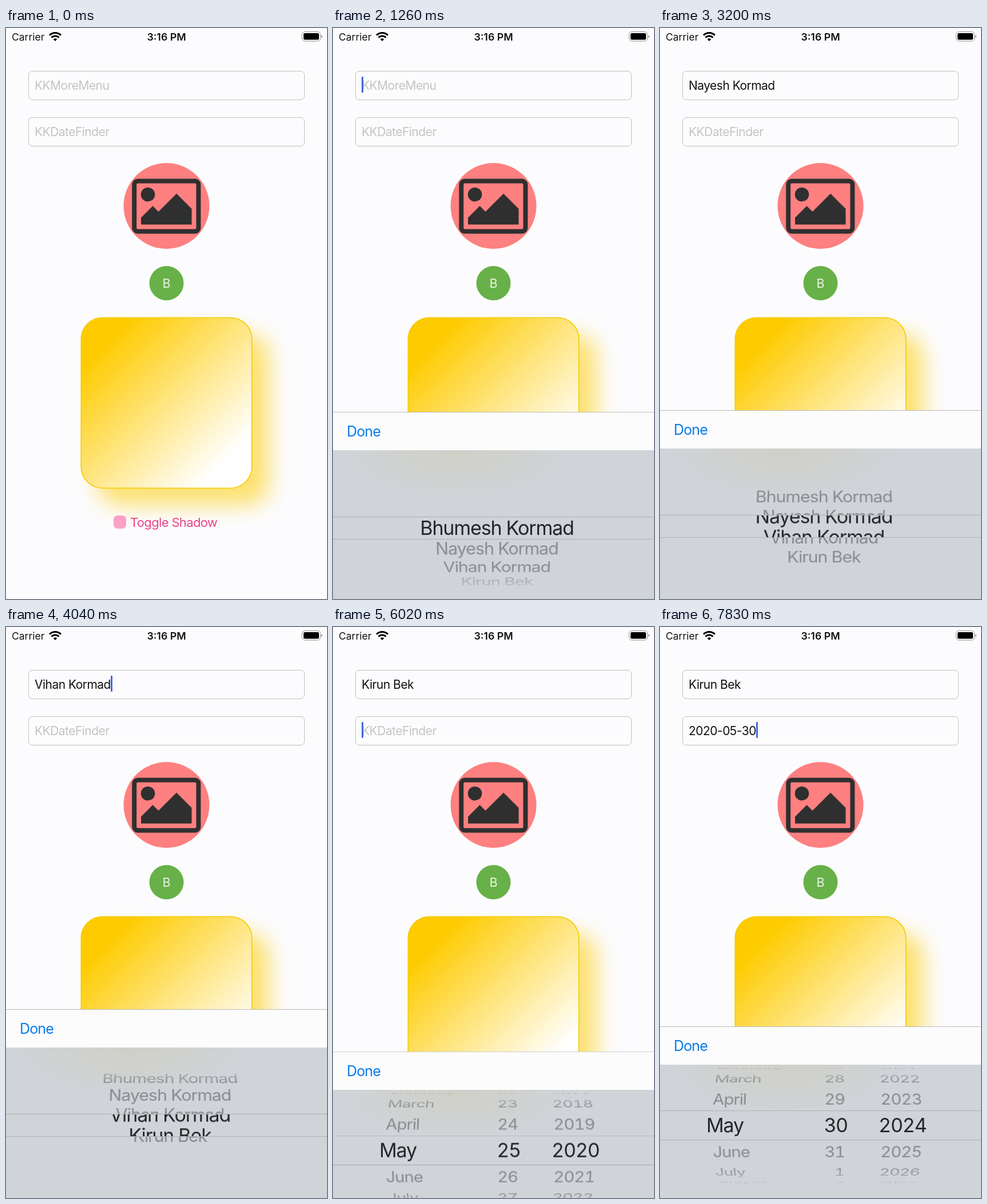
An HTML page without scripts that plays this animation: 561 by 998 pixels, repeating every 7.99 s.

```html
<!DOCTYPE html>
<html lang="en">
<head>
<meta charset="utf-8">
<title>Form controls</title>
<style>
@property --n { syntax: "<number>"; inherits: true; initial-value: 0; }
* { box-sizing: border-box; margin: 0; }
html, body { width: 100%; height: 100%; overflow: hidden; background: #fcfcfe; }
body { font-family: Inter, Roboto, sans-serif; }
.stage { position: relative; width: 561px; height: 998px; overflow: hidden; background: #fcfcfe; }
.stage > *, .stage p { position: absolute; }
p { white-space: nowrap; }

.field { left: 39px; width: 483px; height: 51px; border: 1px solid #bfbfba; border-radius: 7px; }
.field p { left: 10px; top: 0; font-size: 21px; line-height: 49px; letter-spacing: -.025em; color: #111;
  animation: 7.99s step-end infinite; }
.field .hint { color: #c4c4c0; }
.field b { position: absolute; top: 9px; width: 3px; height: 28px; border-radius: 1px; background: #4669dc;
  opacity: 0; animation: 7.99s step-end infinite; }
.name b { animation-name: blink1; }
.date b { animation-name: blink2; }

.box { left: 188px; top: 852px; width: 22px; height: 23px; border-radius: 7px; background: #fba1c5; }
.toggle { left: 217px; top: 849px; font-size: 22px; line-height: 30px; letter-spacing: -.03em; color: #ea4488; }

/* Sheets that slide in from below; the easing is a critically damped spring. */
.panel { left: 0; bottom: 0; width: 561px; overflow: hidden; transform: translateY(100%);
  background: radial-gradient(190px 80px at 215px 67px, #cfd0c7, transparent), #d0d3d7;
  animation: 7.99s infinite linear(0, .096 6.25%, .279 12.5%, .462 18.75%, .615 25%, .733 31.25%, .818 37.5%, .92 50%, .966 62.5%, .988 75%, .996 87.5%, 1); }
.panel > * { position: absolute; }
.bar { left: 0; top: 0; width: 100%; height: 67px; background: #fcfcfd; border-top: 1px solid #b9b9b7; z-index: 1; }
.bar p { left: 24px; top: 18px; font-size: 25px; line-height: 30px; letter-spacing: -.035em; color: #087ce8; }
.people { height: 330px; --c: 203px; --h: 40px; --a: 16.6deg; --r: 126px; animation-name: sheet1; }
.dates { height: 300px; --c: 173px; --h: 52px; --a: 25.4deg; --r: 108px; animation-name: sheet2; }

/* Each wheel is drawn twice: dim outside the band, larger and dark inside it. */
.dim, .band { left: 0; width: 100%; overflow: hidden; font-variant-numeric: tabular-nums; letter-spacing: -.033em; }
.dim { top: calc(var(--c) - 112px); height: 224px; font-size: 30.5px; color: #888b90;
  --top: calc(112px - var(--h) / 2); --end: calc(112px + var(--h) / 2);
  -webkit-mask-image: linear-gradient(transparent, #000 40px, #000 var(--top), transparent var(--top), transparent var(--end), #000 var(--end), #000 184px, transparent);
  mask-image: linear-gradient(transparent, #000 40px, #000 var(--top), transparent var(--top), transparent var(--end), #000 var(--end), #000 184px, transparent); }
.band { top: calc(var(--c) - var(--h) / 2); height: var(--h); font-size: 34px; color: #232529; }
.lines { left: 0; width: 100%; top: calc(var(--c) - var(--h) / 2); height: var(--h); border: solid #afb1b2; border-width: 1px 0; }
.dates .dim { font-size: 29.5px; }
.wheel { position: absolute; left: 0; width: 100%; top: 50%; height: 0;
  animation: 7.99s cubic-bezier(.35, .1, .55, 1) infinite; }
.wheel i { position: absolute; left: 0; width: 100%; top: -24px; line-height: 48px; font-style: normal; white-space: nowrap;
  backface-visibility: hidden;
  transform: perspective(1500px) translateZ(calc(var(--r) * -1)) rotateX(calc((var(--n) - var(--k)) * var(--a))) translateZ(var(--r)); }
.who { animation-name: pick; }
.who i { padding-left: 12px; text-align: center; }
.day { animation-name: day; }
.year { animation-name: year; }
.month i { padding-left: 91px; }
.day i { padding-right: 237.5px; text-align: right; }
.year i { padding-left: 386px; }
.band .month i { padding-left: 81px; }
.band .day i { padding-right: 233px; }
.band .year i { padding-left: 382px; }

@keyframes sheet1 {
  0%, 9.39% { transform: translateY(100%); }
  17.4%, 58.95% { transform: none; }
  66.96%, 100% { transform: translateY(100%); }
}
@keyframes sheet2 {
  0%, 72% { transform: translateY(100%); }
  80%, 100% { transform: none; }
}
@keyframes pick {
  0%, 19.27% { --n: 0; }
  26.9%, 28.5% { --n: .92; }
  29.9%, 37.7% { --n: 1; }
  43.3%, 48.2% { --n: 2; }
  53.6%, 100% { --n: 3; }
}
@keyframes day {
  0%, 80.1% { --n: 0; }
  85.4%, 100% { --n: 5; }
}
@keyframes year {
  0%, 87.6% { --n: 0; }
  90.8%, 94.7% { --n: 2; }
  98%, 100% { --n: 4; }
}
@keyframes hint1 { 0% { opacity: 1; } 29.9%, 100% { opacity: 0; } }
@keyframes name1 { 0% { opacity: 0; } 29.9% { opacity: 1; } 44.06%, 100% { opacity: 0; } }
@keyframes name2 { 0% { opacity: 0; } 44.06% { opacity: 1; } 57.2%, 100% { opacity: 0; } }
@keyframes name3 { 0% { opacity: 0; } 57.2%, 100% { opacity: 1; } }
@keyframes hint2 { 0% { opacity: 1; } 87.86%, 100% { opacity: 0; } }
@keyframes date1 { 0% { opacity: 0; } 87.86%, 100% { opacity: 1; } }
@keyframes blink1 {
  0%, 16.3%, 25.8%, 38.3%, 51.1%, 100% { opacity: 0; }
  9.7%, 19.5%, 32.2%, 44.8% { opacity: 1; }
}
@keyframes blink2 {
  0%, 79.1%, 85.4% { opacity: 0; }
  72.2%, 82.4%, 95.1%, 100% { opacity: 1; }
}
</style>
</head>
<body>
<div class="stage">
  <svg width="561" height="998" viewBox="0 0 561 998" font-family="Inter, Roboto, sans-serif">
    <defs>
      <linearGradient id="gold" x1="0" y1="0" x2="1" y2="1">
        <stop offset=".15" stop-color="#fecb00"/>
        <stop offset=".84" stop-color="#fff"/>
      </linearGradient>
      <filter id="soft" x="-30%" y="-30%" width="160%" height="160%"><feGaussianBlur stdDeviation="19"/></filter>
    </defs>
    <text x="10" y="22" font-size="17.5" fill="#111">Carrier</text>
    <text x="280.5" y="22" font-size="17.8" font-weight="600" text-anchor="middle" fill="#111">3:16 PM</text>
    <g fill="none" stroke="#000" stroke-width="3">
      <path d="M76.1 12.6a14 14 0 0 1 19.8 0M79.6 16.7a9 9 0 0 1 12.8 0"/>
      <path d="M86 23l-3.3-3.3a4.7 4.7 0 0 1 6.6 0z" fill="#000" stroke="none"/>
    </g>
    <rect x="517.5" y="6.5" width="32" height="16.5" rx="5" fill="none" stroke="#929292"/>
    <rect x="520" y="9" width="27" height="11.5" rx="2.5"/>
    <path d="M551 12.2q2 .8 2 2.6t-2 2.6z" fill="#929292"/>
    <circle cx="280.5" cy="311" r="75" fill="#fe8080"/>
    <g fill="#2f2f2f">
      <rect x="224.2" y="267.5" width="112.2" height="88" rx="6" fill="none" stroke="#2f2f2f" stroke-width="8"/>
      <circle cx="248" cy="291" r="12.3"/>
      <path d="M236 343.5V331.500L256.500 311l10 10L298 289.500l26.500 26.500v27.500z"/>
    </g>
    <circle cx="280.5" cy="446" r="30" fill="#67b148"/>
    <text x="280.5" y="454" font-size="21.5" text-anchor="middle" fill="#eaf4e6">B</text>
    <rect x="160" y="535" width="300" height="299" rx="38" fill="#fccc00" opacity=".57" filter="url(#soft)"/>
    <rect x="131.3" y="506.2" width="298.4" height="298" rx="37.5" fill="url(#gold)" stroke="#f3cb00" stroke-width="1.6"/>
  </svg>

  <div class="field name" style="top:75px">
    <p class="hint" style="animation-name:hint1"><b></b>KKMoreMenu</p>
    <p style="animation-name:name1">Nayesh Kormad<b></b></p>
    <p style="animation-name:name2">Vihan Kormad<b></b></p>
    <p style="animation-name:name3">Kirun Bek</p>
  </div>
  <div class="field date" style="top:156px">
    <p class="hint" style="animation-name:hint2"><b></b>KKDateFinder</p>
    <p style="animation-name:date1">2020-05-30<b></b></p>
  </div>

  <div class="box"></div>
  <p class="toggle">Toggle Shadow</p>

  <div class="panel people">
    <div class="bar"><p>Done</p></div>
    <div class="dim"><div class="wheel who">
      <i style="--k:0">Bhumesh Kormad</i><i style="--k:1">Nayesh Kormad</i><i style="--k:2">Vihan Kormad</i><i style="--k:3">Kirun Bek</i>
    </div></div>
    <div class="band"><div class="wheel who">
      <i style="--k:0">Bhumesh Kormad</i><i style="--k:1">Nayesh Kormad</i><i style="--k:2">Vihan Kormad</i><i style="--k:3">Kirun Bek</i>
    </div></div>
    <div class="lines"></div>
  </div>

  <div class="panel dates">
    <div class="bar"><p>Done</p></div>
    <div class="dim">
      <div class="wheel month">
        <i style="--k:-3">February</i><i style="--k:-2">March</i><i style="--k:-1">April</i><i style="--k:0">May</i><i style="--k:1">June</i><i style="--k:2">July</i><i style="--k:3">August</i>
      </div>
      <div class="wheel day">
        <i style="--k:-3">22</i><i style="--k:-2">23</i><i style="--k:-1">24</i><i style="--k:0">25</i><i style="--k:1">26</i><i style="--k:2">27</i><i style="--k:3">28</i><i style="--k:4">29</i><i style="--k:5">30</i><i style="--k:6">31</i><i style="--k:7">1</i><i style="--k:8">2</i>
      </div>
      <div class="wheel year">
        <i style="--k:-3">2017</i><i style="--k:-2">2018</i><i style="--k:-1">2019</i><i style="--k:0">2020</i><i style="--k:1">2021</i><i style="--k:2">2022</i><i style="--k:3">2023</i><i style="--k:4">2024</i><i style="--k:5">2025</i><i style="--k:6">2026</i><i style="--k:7">2027</i>
      </div>
    </div>
    <div class="band">
      <div class="wheel month"><i style="--k:0">May</i></div>
      <div class="wheel day">
        <i style="--k:0">25</i><i style="--k:1">26</i><i style="--k:2">27</i><i style="--k:3">28</i><i style="--k:4">29</i><i style="--k:5">30</i><i style="--k:6">31</i>
      </div>
      <div class="wheel year">
        <i style="--k:0">2020</i><i style="--k:1">2021</i><i style="--k:2">2022</i><i style="--k:3">2023</i><i style="--k:4">2024</i><i style="--k:5">2025</i>
      </div>
    </div>
    <div class="lines"></div>
  </div>
</div>
</body>
</html>
```
